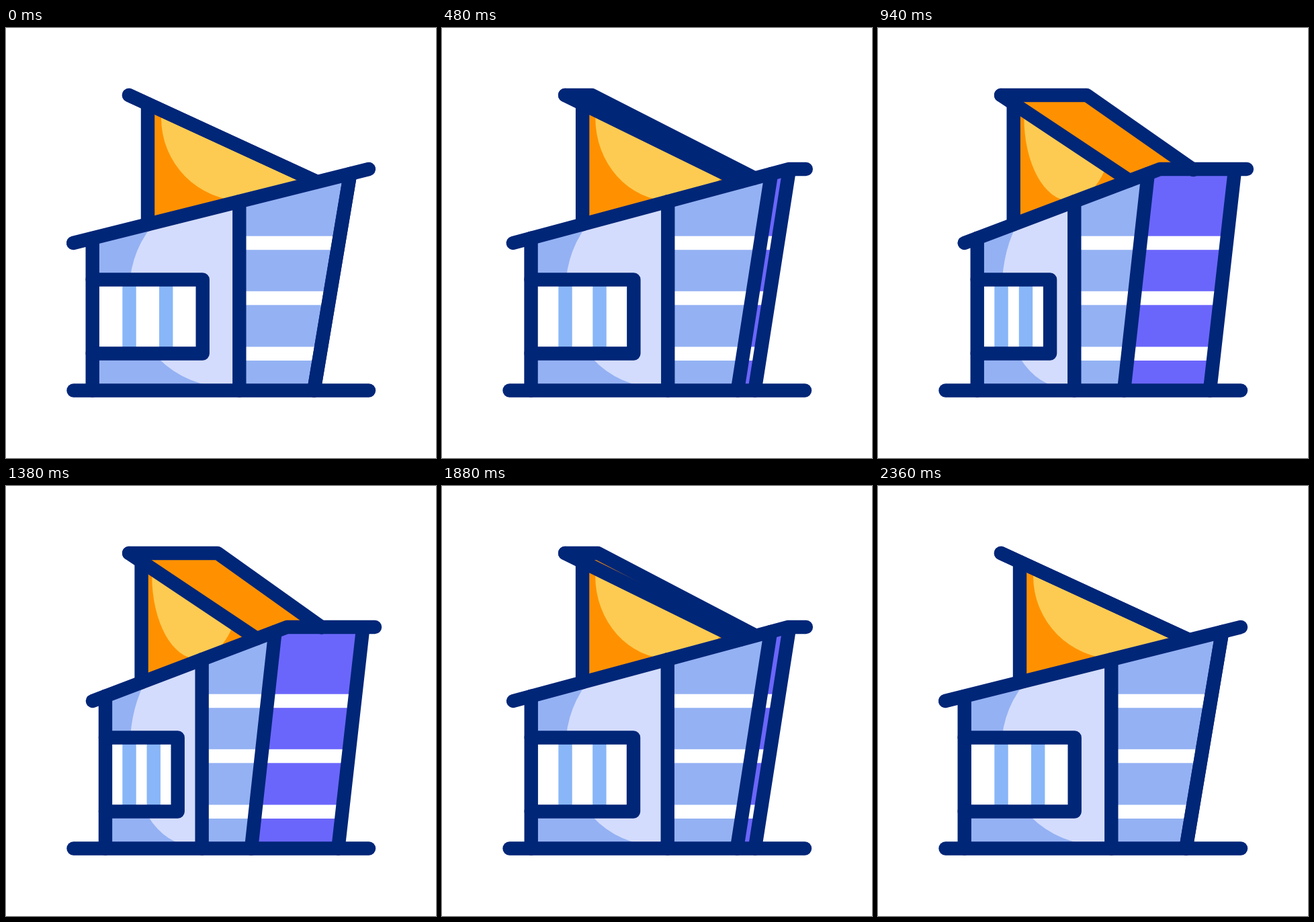
Recreate the animation shown at these times as an HTML page with a canvas. Size 640 by 640 pixels, loop 2400 ms.

```html
<!DOCTYPE html>
<html lang="en">
<head>
<meta charset="utf-8">
<title>Turning house</title>
<style>
  html, body { margin: 0; width: 100%; height: 100%; overflow: hidden; background: #fff; }
  canvas { display: block; width: 640px; height: 640px; }
</style>
</head>
<body>
<canvas id="stage" width="640" height="640"></canvas>
<script>
const ctx = document.getElementById('stage').getContext('2d');
const LOOP = 2400;
const NAVY = '#002678', BLUE = '#94b1f3', PALE = '#d3dcfd', GLASS = '#88b6f8',
      VIOLET = '#6b66fb', ORANGE = '#ff9100', YELLOW = '#fdcb52', WHITE = '#fff';
const GROUND = 539.5;

// Symmetric cubic-bezier(a, 0, 1 - a, 1)
function ease(x, a) {
  x = Math.max(0, Math.min(1, x));
  let lo = 0, hi = 1, u;
  for (let i = 0; i < 30; i++) {
    u = (lo + hi) / 2;
    const v = 1 - u;
    if (3 * a * u * v * v + 3 * (1 - a) * u * u * v + u * u * u < x) lo = u; else hi = u;
  }
  return u * u * (3 - 2 * u);
}

const mix = (a, b, k) => a + (b - a) * k;
const heightAt = (x, [x1, y1], [x2, y2]) => y1 + (y2 - y1) * (x - x1) / (x2 - x1);

function trace(points) {
  ctx.beginPath();
  points.forEach(([x, y]) => ctx.lineTo(x, y));
}

function fill(color, points) {
  trace(points);
  ctx.fillStyle = color;
  ctx.fill();
}

function line(...points) {
  trace(points);
  ctx.stroke();
}

function rect(color, x, y, w, h) {
  ctx.fillStyle = color;
  ctx.fillRect(x, y, w, h);
}

// Fills a face, then paints details clipped to it
function face(color, points, details) {
  ctx.save();
  fill(color, points);
  ctx.clip();
  details();
  ctx.restore();
}

function ellipse(color, x, y, rx, ry) {
  ctx.beginPath();
  ctx.ellipse(x, y, rx, ry, 0, 0, 2 * Math.PI);
  ctx.fillStyle = color;
  ctx.fill();
}

function bands() {
  for (const y of [309.7, 391.8, 474.5]) rect(WHITE, 0, y, 640, 20.5);
}

function draw(t) {
  const turn = ease(Math.min(t, 2368 - t) / 1184, 0.8);
  const slide = ease(Math.min(t, LOOP - t) / 1180, 0.57);
  const at = (a, b) => mix(a, b, turn);

  // Lower roof and walls
  const eave = [at(100, 129.5), 320];
  const corner = [at(540, 416), 210];
  const roofEnd = [at(540, 549.2), 210];
  const wallX = at(128.7, 148.3), midX = at(347.3, 290.6);
  const wallTop = [wallX, heightAt(wallX, eave, corner)], wallFoot = [wallX, GROUND];
  const midTop = [midX, heightAt(midX, eave, corner)], midFoot = [midX, GROUND];
  const frontTop = [at(512.3, 398.5), 217], frontFoot = [at(458.3, 363.3), GROUND];
  const backTop = [at(512.3, 531), 217], backFoot = [at(458.3, 495), GROUND];

  // Upper roof
  const peak = [183, 100];
  const ridge = [mix(183, 318, slide), 100];
  const ridgeFoot = [mix(463, 470, slide), mix(229, 210, slide)];
  const slopeFoot = [at(463, 371.4), at(229, 227)];
  const atticX = at(211, 201.4);
  const atticTop = [atticX, heightAt(atticX, peak, slopeFoot)];
  const atticFoot = [atticX, heightAt(atticX, eave, corner)];

  rect(WHITE, 0, 0, 640, 640);

  fill(ORANGE, [peak, ridge, ridgeFoot, corner, slopeFoot]);
  face(ORANGE, [atticTop, slopeFoot, atticFoot], () =>
    ellipse(YELLOW, at(353, 283), 134, at(122, 66), 123));

  face(VIOLET, [frontTop, corner, backTop, backFoot, frontFoot], bands);
  face(BLUE, [midTop, frontTop, frontFoot, midFoot], bands);
  face(BLUE, [wallTop, midTop, midFoot, wallFoot], () =>
    ellipse(PALE, at(331, 276), 388, at(147, 91.4), 147));

  const windowX = at(292.7, 255);
  rect(WHITE, wallX, 374.5, windowX - wallX, 110);
  rect(GLASS, 173.3, 374.5, 20.4, 110);
  rect(GLASS, at(228, 209.2), 374.5, 20.4, 110);

  ctx.strokeStyle = NAVY;
  ctx.lineWidth = 20.4;
  ctx.lineCap = ctx.lineJoin = 'round';
  line([100.5, GROUND], [540, GROUND]);
  line(wallTop, wallFoot);
  line(midTop, midFoot);
  line(frontTop, frontFoot);
  line(backTop, backFoot);
  line([wallX, 374.5], [windowX, 374.5], [windowX, 484.5], [wallX, 484.5]);
  line(atticTop, atticFoot);
  line(peak, slopeFoot);
  line(peak, ridge, ridgeFoot);
  line(eave, corner, roofEnd);
}

function tick() {
  draw(performance.now() % LOOP);
  requestAnimationFrame(tick);
}
tick();
</script>
</body>
</html>
```
